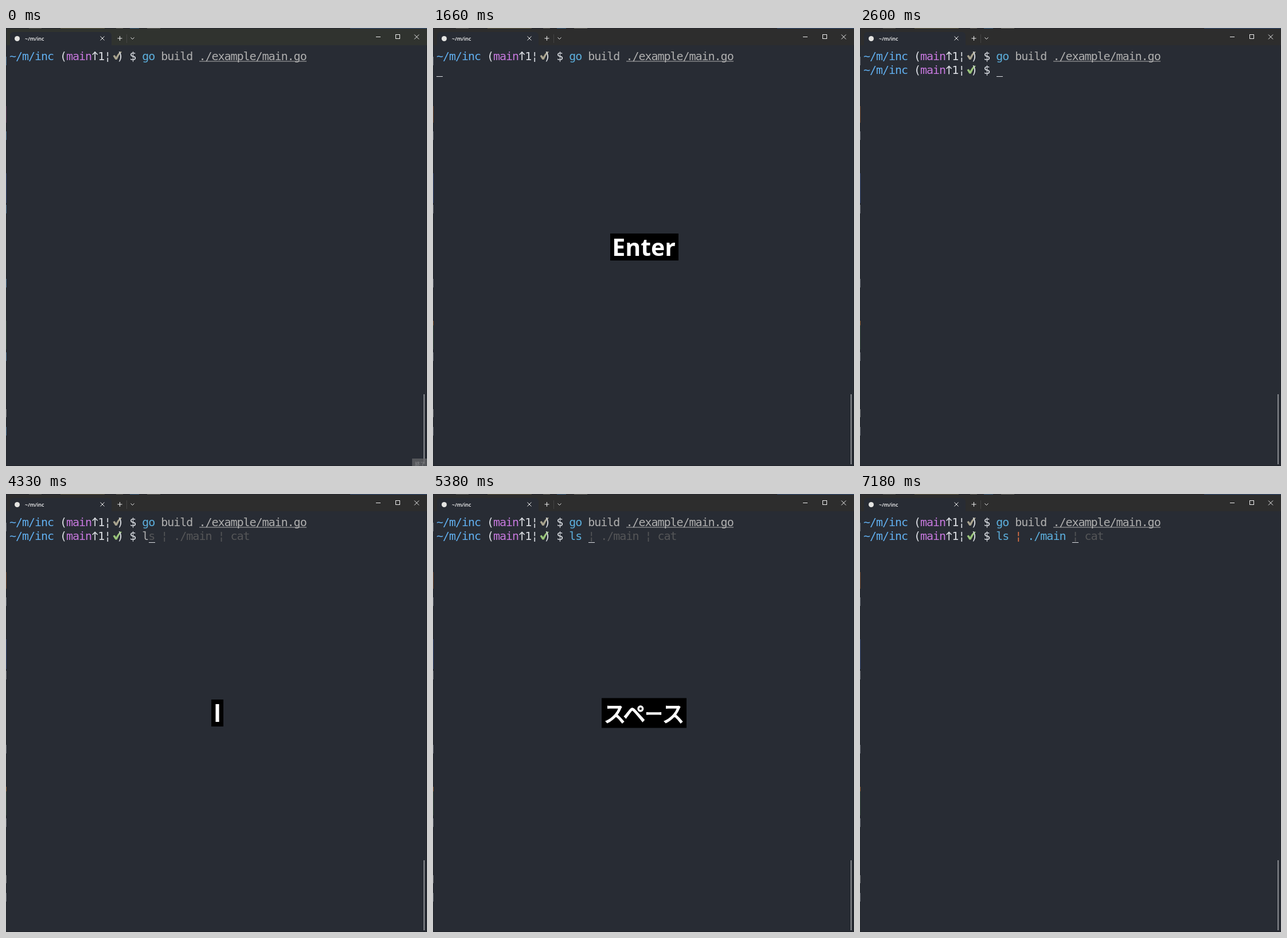
These frames come from a looping animation (734 by 763 pixels, 8 s). An HTML page with a canvas:

```html
<!DOCTYPE html>
<html lang="en">
<head>
<meta charset="utf-8">
<title>Terminal session</title>
<style>
  html, body { margin: 0; width: 100%; height: 100%; overflow: hidden; background: #282c34; }
  canvas { display: block; }
</style>
</head>
<body>
<canvas id="stage" width="734" height="763"></canvas>
<script>
const ctx = document.getElementById('stage').getContext('2d');
const LOOP = 8000, LEFT = 6.45, CELL = 11.015;
const ROW1 = 55.5, ROW2 = 80;
const BG = '#282c34', LIGHT = '#dcdfe4', GREY = '#afafaf', DIM = '#555658';
const BLUE = '#61afef', COMMAND = '#5cafdd', PINK = '#c678dd', ORANGE = '#dd7145';
const MONO = '20px "DejaVu Sans Mono", monospace';
const LABEL = 'bold 41px "Open Sans", "Noto Sans", sans-serif';
const KANA = '"Noto Sans CJK JP", "Noto Sans CJK", sans-serif';

const LINE = 'ls ¦ ./main ¦ cat';
const COMMAND_COL = 21;
// [time, number of typed characters]
const TYPING = [[4330, 1], [4450, 2], [4520, 3], [6500, 5], [6720, 6], [6980, 11], [7180, 12]];
// [time, key shown]
const KEYS = [[1660, 'Enter'], [2600, ''], [4330, 'l'], [4450, 's'], [4590, 's スペース'], [5380, 'スペース'], [5510, '']];

const latest = (steps, t, start) => steps.reduce((value, [at, next]) => t >= at ? next : value, start);
const columnX = col => LEFT + col * CELL;

function rect(x, y, w, h, color) {
  ctx.fillStyle = color;
  ctx.fillRect(x, y, w, h);
}

function text(str, x, y, font, color, align = 'center') {
  ctx.font = font;
  ctx.fillStyle = color;
  ctx.textAlign = align;
  ctx.fillText(str, x, y);
}

function stroke(lines, color = '#f0f0f0', width = 1) {
  ctx.strokeStyle = color;
  ctx.lineWidth = width;
  ctx.beginPath();
  for (const [x1, y1, x2, y2] of lines) {
    ctx.moveTo(x1, y1);
    ctx.lineTo(x2, y2);
  }
  ctx.stroke();
}

const cross = (x, y, r) => stroke([[x - r, y - r, x + r, y + r], [x - r, y + r, x + r, y - r]]);

// Writes one character per terminal cell.
function cells(str, col, y, color) {
  [...str].forEach((ch, i) => {
    if (ch !== ' ') text(ch, columnX(col + i + 0.5), y, MONO, color);
  });
}

function cursor(col, y) {
  rect(Math.round(columnX(col)), y, 11, 1, LIGHT);
}

function prompt(y, checkColor) {
  cells('~/m/inc', 0, y, BLUE);
  cells('(', 8, y, LIGHT);
  cells('main', 9, y, PINK);
  const x = columnX(13.5);
  stroke([[x, y + 0.5, x, y - 13.5], [x - 4.5, y - 9, x + 0.5, y - 14], [x + 4.5, y - 9, x - 0.5, y - 14]], LIGHT, 1.7);
  cells('1¦', 14, y, LIGHT);
  ctx.fillStyle = checkColor;
  ctx.beginPath();
  ctx.moveTo(186.5, y - 7);
  ctx.lineTo(189.5, y - 8.5);
  ctx.lineTo(192, y - 5);
  ctx.quadraticCurveTo(195, y - 11.5, 199.5, y - 14.5);
  ctx.lineTo(202, y - 14);
  ctx.quadraticCurveTo(196.5, y - 8, 193.5, y - 0.5);
  ctx.lineTo(190.5, y - 0.5);
  ctx.closePath();
  ctx.fill();
  cells(')', 17, y, LIGHT);
  cells('$', 19, y, LIGHT);
}

function windowFrame(active) {
  rect(0, 0, 734, 763, BG);
  rect(0, 0, 734, 30, active ? '#2d2d2d' : '#30332f');

  // Desktop showing along the window's edges
  rect(0, 0, 734, 1, '#25272f');
  [[40, 22, '#545452'], [95, 77, '#5a5541'], [192, 12, '#5a5954'], [216, 16, '#34587a'],
   [246, 23, '#62625f'], [600, 134, '#304a72']].forEach(([x, w, color]) => rect(x, 0, w, 1, color));
  rect(0, 1, 1, 762, '#24282f');
  [50, 180, 308, 437, 565, 695].forEach(y => rect(0, y, 1, 15, active ? '#6a6f76' : '#4a7090'));
  rect(0, 136, 1, 29, active ? '#70492f' : '#553650');
  rect(0, 253, 1, 52, '#364873');
  rect(0, 510, 1, 50, '#33463c');
  if (active) rect(0, 510, 1, 8, '#8c5a30');
  rect(0, 664, 1, 14, '#75777a');
  rect(733, 30, 1, 733, '#20232a');
  rect(0, 762, 734, 1, '#20232a');

  // Tab
  ctx.fillStyle = BG;
  ctx.beginPath();
  ctx.roundRect(7, 7, 177, 23, [6, 6, 0, 0]);
  ctx.fill();
  ctx.fillStyle = '#e4e4e2';
  ctx.beginPath();
  ctx.arc(19.5, 18.5, 4.5, 0, Math.PI * 2);
  ctx.fill();
  text('~/m/inc', 33, 22, '600 9px "Open Sans", "Noto Sans", sans-serif', '#fff', 'left');
  cross(168, 18, 3.5);

  // Tab bar and window buttons
  stroke([[194.5, 18, 202.5, 18], [198.5, 14, 198.5, 22],
          [217.5, 16.5, 220.5, 19.5], [220.5, 19.5, 223.5, 16.5], [645, 15.5, 653, 15.5]]);
  stroke([[210.5, 11, 210.5, 26]], '#454545');
  ctx.strokeStyle = '#f0f0f0';
  ctx.strokeRect(679.5, 11.5, 7, 7);
  cross(716, 15.5, 4);
  rect(728.2, 638, 1.5, 122, '#a9abae');
}

function commandLine(t) {
  const typed = latest(TYPING, t, 0);
  prompt(ROW2, '#98c379');
  if (typed) {
    [...LINE].forEach((ch, i) => {
      const color = i >= typed ? DIM : typed === 1 ? GREY : ch === '¦' ? ORANGE : COMMAND;
      cells(ch, COMMAND_COL + i, ROW2, color);
    });
  }
  cursor(COMMAND_COL + typed, 84);
}

// Regular weight thickened by an outline gives a medium weight.
function kana(x) {
  ctx.strokeStyle = '#fff';
  ctx.lineWidth = 1.6;
  [...'スペース'].forEach((ch, i) => {
    const [size, y] = ch === 'ー' ? [31, 394] : [39, 397];
    text(ch, x + i * 34, y, `${size}px ${KANA}`, '#fff');
    ctx.strokeText(ch, x + i * 34, y);
  });
}

function keyDisplay(key) {
  if (!key) return;
  const [x, y, w, h] = {
    'Enter': [309, 358, 119, 47], 'l': [358, 358, 21, 47], 's': [352, 358, 33, 47],
    's スペース': [273, 355.5, 190, 52], 'スペース': [294, 355.5, 148, 52]
  }[key];
  rect(x, y, w, h, '#000');
  if (key === 's スペース') {
    text('s', 288.5, 398, LABEL, '#fff');
    kana(339.5);
  } else if (key === 'スペース') {
    kana(317);
  } else {
    text(key, x + w / 2 - (key === 'Enter' ? 1 : 0), 397, LABEL, '#fff');
  }
}

// Small tooltip carried from the lower right corner toward the middle.
function tooltip(t) {
  const step = Math.max(0, Math.ceil((t - 69) / 60)) / 3;
  const x = 708 - 323 * step, y = 750 - 570 * step;
  rect(x, y, 30, 16, 'rgba(100, 102, 105, 0.75)');
  text('終了', x + 14, y + 13, `9px ${KANA}`, '#85878a');
}

function draw() {
  const t = performance.now() % LOOP;
  const active = t >= 720;
  windowFrame(active);

  prompt(ROW1, '#a8a38e');
  cells('go', COMMAND_COL, ROW1, COMMAND);
  cells('build ./example/main.go', 24, ROW1, GREY);
  rect(337, 57.5, 187, 1, GREY);

  if (t >= 1860) commandLine(t);
  else if (t >= 1660) cursor(0, 84);
  else if (active) cursor(47, 59);

  keyDisplay(latest(KEYS, t, ''));
  if (t < 250) tooltip(t);
  requestAnimationFrame(draw);
}

draw();
</script>
</body>
</html>
```
